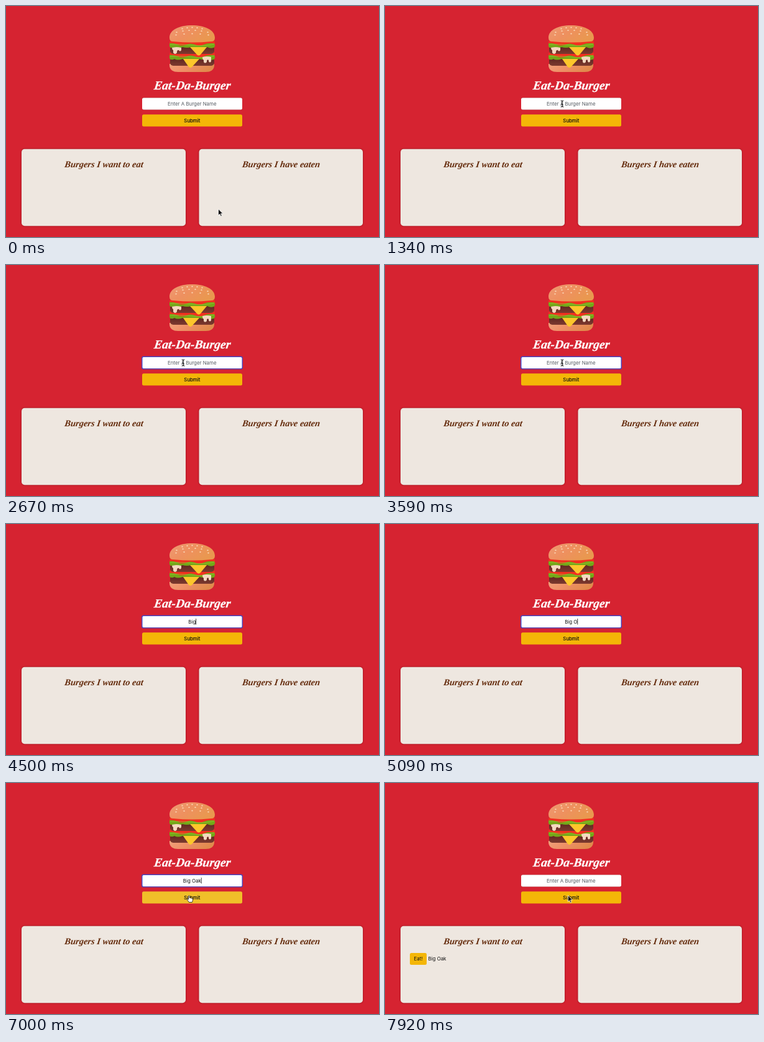
An HTML page for the animation above (8 s loop, 600 px wide and 371 px high).

```html
<!DOCTYPE html>
<html lang="en">
<head>
<meta charset="utf-8">
<title>Eat-Da-Burger</title>
<style>
  html, body { margin: 0; width: 100%; height: 100%; overflow: hidden; background: #d62331; }
  svg { display: block; width: 600px; height: 371px; }
  text { font: 7.9px Inter, "Liberation Sans", sans-serif; fill: #111; white-space: pre; }
  .mid { text-anchor: middle; }
  .script { font: italic bold 14.5px "Liberation Serif", serif; fill: #642b0c; }
  .title { font-size: 19.6px; fill: #fff; }
  .button { fill: #f4b607; }
  .button.hover { fill: #f0bf29; }
  .card { fill: #eee7e0; filter: drop-shadow(0 .5px 1.5px #0005); }
  .field { filter: drop-shadow(0 .5px .5px #0006); }
</style>
</head>
<body>
<svg viewBox="0 0 600 371">
  <defs>
    <linearGradient id="bun" x2="1" y2=".5">
      <stop offset="0" stop-color="#ee9a74"/><stop offset=".5" stop-color="#ee905f"/><stop offset="1" stop-color="#e9984f"/>
    </linearGradient>
    <linearGradient id="base" x2="1" y2=".3">
      <stop offset="0" stop-color="#f0a27c"/><stop offset=".5" stop-color="#ee8f66"/><stop offset="1" stop-color="#e08a4c"/>
    </linearGradient>
    <linearGradient id="patty" x2="0" y2="1">
      <stop offset="0" stop-color="#5c2420"/><stop offset="1" stop-color="#7d3a2f"/>
    </linearGradient>
    <g id="filling">
      <rect x="263" y="55" width="73" height="10" rx="4" fill="#f2301f"/>
      <rect x="264" y="64" width="71" height="13" rx="5" fill="url(#patty)"/>
      <path d="M263 60Q269 59 276 62T290 62T304 62T318 62T335 60Q338 64 334 67Q329 69 324 66Q317 68 311 66Q304 69 298 66Q291 68 284 66Q276 69 271 66Q265 69 263 65Z" fill="#73a818"/>
      <path d="M264 62Q278 61 299 63T335 61" fill="none" stroke="#98c234" stroke-width=".8"/>
    </g>
  </defs>

  <rect width="600" height="371" fill="#d62331"/>

  <g id="burger">
    <path d="M263 93H335V96Q334 106 321 106H277Q264 106 263 96Z" fill="url(#base)"/>
    <use href="#filling" y="19"/>
    <path d="M285 85H311L299 98Q297 100 294 98Z" fill="#fcc62b"/>
    <path d="M316 82Q323 80 330 82V89Q328 92 326 89V87Q324 85 323 88V90Q320 93 318 90V87Q316 86 316 82Z" fill="#f5d8c0"/>
    <use href="#filling"/>
    <path d="M296 66H323L313 78Q310 81 307 78Z" fill="#fcc62b"/>
    <path d="M267 67Q274 65 282 67V71Q280 74 278 71Q276 70 275 73V75Q272 79 269 75V71Q267 70 267 67Z" fill="#f5d8c0"/>
    <path d="M263 51C263 38 279 31 299 31S336 38 336 51Q336 57 330 57Q299 60 269 57Q263 57 263 51Z" fill="url(#bun)"/>
    <g id="seeds" fill="#fbd9b8"></g>
  </g>

  <text class="mid script title" transform="translate(299 134) skewX(-8)" stroke="#fff" stroke-width=".3">Eat-Da-Burger</text>

  <rect class="field" x="219" y="147.5" width="161" height="19" rx="2.5" fill="#fff"/>
  <rect id="ring" x="218.8" y="147.3" width="161.4" height="19.6" rx="2.5" fill="none" stroke="#4545c4" stroke-width="1.4"/>
  <text id="placeholder" class="mid" x="299.3" y="160" style="fill:#555b62">Enter A Burger Name</text>
  <text id="entry" class="mid" x="299.3" y="159.5"></text>
  <rect id="caret" y="152" width=".8" height="9.5" fill="#111"/>

  <rect id="submit" class="button" x="219" y="174.3" width="161" height="19.2" rx="2.5"/>
  <text class="mid" x="299.3" y="186.5" stroke="#111" stroke-width=".15">Submit</text>

  <rect class="card" x="25" y="229.7" width="264" height="123.5" rx="5"/>
  <rect class="card" x="310.5" y="229.7" width="263.5" height="123.5" rx="5"/>
  <text class="mid script" transform="translate(157 258.5) skewX(-8)">Burgers I want to eat</text>
  <text class="mid script" transform="translate(442 258.5) skewX(-8)">Burgers I have eaten</text>

  <g id="item">
    <rect class="button" x="40" y="273" width="27" height="19" rx="2.5"/>
    <text class="mid" x="53.5" y="285.3">Eat!</text>
    <text id="itemName" x="69.5" y="285.3"></text>
  </g>

  <g id="cursor">
    <path id="arrow" d="M0 0V10.3L2.4 8.1L4 11.8L5.8 11L4.2 7.4H7.4Z" fill="#111" stroke="#fff" stroke-width=".8"/>
    <path id="beam" d="M-2.3-5Q0-5 0-3.5Q0-5 2.3-5M0-3.5V3.5M-2.3 5Q0 5 0 3.5Q0 5 2.3 5M-1.3 1.2H1.3" fill="none" stroke="#111" stroke-width="1.1"/>
    <path id="hand" d="M-1 1Q0-.5 1 1V4Q2.3 3.3 3 4.4Q4.2 3.8 4.7 5Q6.2 4.8 6.2 6.4Q6.2 9 5 11H0Q-1 9-3.2 6.8Q-3.2 5-1 6.6Z" fill="#fff" stroke="#111" stroke-width=".8"/>
  </g>
</svg>
<script>
const LOOP = 8000;
const NAME = "Big Oak";
const KEY_TIMES = [3650, 3900, 4150, 4750, 5000, 5280, 5600];
const FOCUS = 1900, WAKE = 6100, SUBMIT = 7590;
const START = [341.5, 326], FIELD = [285, 157], BUTTON = [294.3, 180.5];

const el = Object.fromEntries([...document.querySelectorAll("[id]")].map(e => [e.id, e]));
const show = (node, on) => node.style.display = on ? "" : "none";
const ease = (t, from, to) => {
  const p = Math.min(1, Math.max(0, (t - from) / (to - from)));
  return p * p * (3 - 2 * p);
};
const mix = (a, b, p) => a.map((v, i) => v + (b[i] - v) * p);

// Sesame seeds in three curved rows
[[5, 34.5, 8], [6, 39, 10], [5, 44.5, 13]].forEach(([count, y, gap]) => {
  for (let i = 0; i < count; i++) {
    const offset = i - (count - 1) / 2;
    el.seeds.insertAdjacentHTML("beforeend",
      `<ellipse cx="${299.5 + offset * gap}" cy="${y + offset * offset * .5}" rx="1.2" ry=".9"/>`);
  }
});
el.itemName.textContent = NAME;

function pointer(t) {
  return t < WAKE
    ? mix(START, FIELD, ease(t, 90, 900))
    : mix(FIELD, BUTTON, ease(t, WAKE, 6600));
}

function draw(t) {
  const submitted = t >= SUBMIT;
  const focused = t >= FOCUS && !submitted;
  const typed = KEY_TIMES.filter(k => k <= t).length;
  const text = submitted ? "" : NAME.slice(0, typed);
  const lastInput = typed ? KEY_TIMES[typed - 1] : FOCUS;

  el.entry.textContent = text;
  show(el.placeholder, !text);
  show(el.ring, focused);
  show(el.caret, focused && (t - lastInput) % 1000 < 500);
  el.caret.setAttribute("x", 299.3 + (text ? el.entry.getComputedTextLength() / 2 : 0));
  show(el.item, submitted);

  const [x, y] = pointer(t);
  const inside = (top, bottom) => !submitted && x > 219 && x < 380 && y > top && y < bottom;
  const overField = inside(147.5, 166.5), overButton = inside(174.3, 193.5);
  const awake = t < KEY_TIMES[0] || t >= WAKE;
  el.submit.classList.toggle("hover", overButton);
  show(el.cursor, awake);
  show(el.beam, overField);
  show(el.hand, overButton);
  show(el.arrow, !overField && !overButton);
  el.cursor.setAttribute("transform", `translate(${x} ${y})`);
}

const begin = performance.now();
function tick() {
  draw((performance.now() - begin) % LOOP);
  requestAnimationFrame(tick);
}
tick();
</script>
</body>
</html>
```
